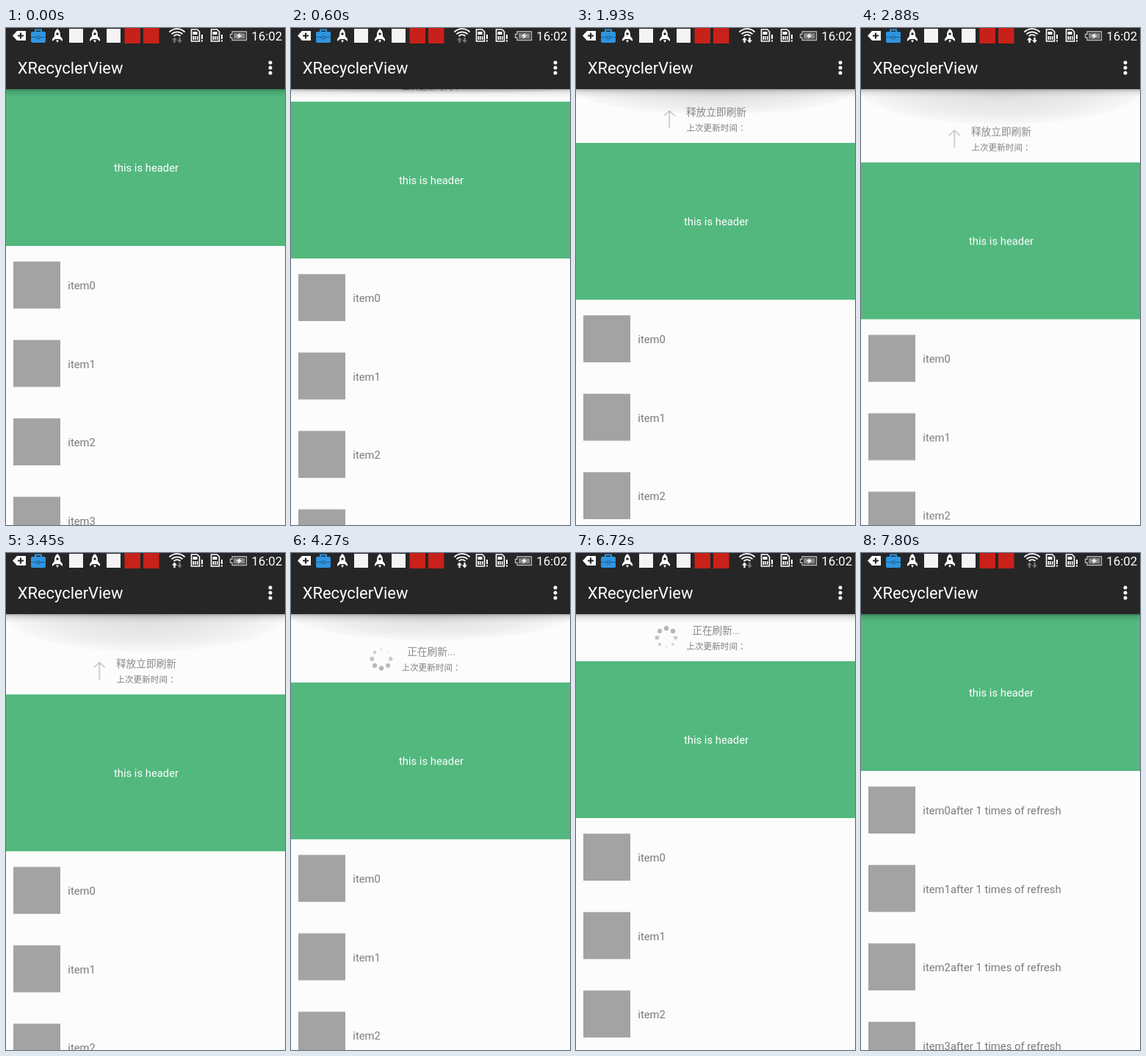
An HTML page that plays this animation: 380x675 px, repeating every 8 s.

```html
<!DOCTYPE html>
<html lang="zh-CN">
<head>
<meta charset="utf-8">
<title>XRecyclerView</title>
<style>
html, body { margin: 0; width: 100%; height: 100%; overflow: hidden; background: #fcfcfc; }
svg { display: block; width: 380px; height: 675px; }
text { font-family: Roboto, "Noto Sans CJK SC", "Noto Sans CJK", sans-serif; }
.mid { text-anchor: middle; }
.label { font-size: 14.8px; fill: #7b7b7b; }
.state { font-size: 13.7px; fill: #888; }
.stamp { font-size: 11.6px; fill: #7d7d7d; }
.colon { font-family: "Noto Sans CJK TC", "Noto Sans CJK", sans-serif; }

/* List position: slow drag, snap to the refresh height, then collapse */
.list { animation: drag 8s linear infinite; }
@keyframes drag {
  0%, 2.4% { transform: translateY(0); }
  14.125% { transform: translateY(39px); }
  24.125% { transform: translateY(73px); }
  30% { transform: translateY(88px); }
  36% { transform: translateY(99.5px); }
  43% { transform: translateY(109px); }
  46.1%, 48.5% { transform: translateY(111px); }
  49.8% { transform: translateY(112px); }
  51.75% { transform: translateY(112px); animation-timing-function: cubic-bezier(.37, 0, .63, 1); }
  55.5% { transform: translateY(64px); }
  93.6% { transform: translateY(64px); animation-timing-function: cubic-bezier(.37, 0, .63, 1); }
  97.4%, 100% { transform: translateY(0); }
}

/* Refresh states */
.pull, .release, .busy, .done, .stale { opacity: 0; animation: 8s step-end infinite; }
.pull { animation-name: pull; }
.release { animation-name: release; }
.busy { animation-name: busy; }
.done { animation-name: done; }
.stale { animation-name: stale; }
@keyframes pull { 0% { opacity: 1; } 21.4%, 100% { opacity: 0; } }
@keyframes release { 0% { opacity: 0; } 21.4% { opacity: 1; } 51.9%, 100% { opacity: 0; } }
@keyframes busy { 0% { opacity: 0; } 51.9% { opacity: 1; } 87.6%, 100% { opacity: 0; } }
@keyframes done { 0% { opacity: 0; } 87.6%, 100% { opacity: 1; } }
@keyframes stale { 0% { opacity: 1; } 87.6%, 100% { opacity: 0; } }

.suffix { fill: transparent; animation: suffix 8s step-end infinite; }
@keyframes suffix { 0% { fill: transparent; } 87.6%, 100% { fill: #7b7b7b; } }

.arrow {
  fill: none; stroke: #c4c4c4; stroke-width: 1.6; transform-origin: 0 0;
  animation: turn 8s linear infinite, hide 8s step-end infinite;
}
@keyframes turn { 0%, 21.4% { transform: rotate(0); } 23.65%, 100% { transform: rotate(-180deg); } }
@keyframes hide { 0% { opacity: 1; } 51.9%, 100% { opacity: 0; } }

.ball { fill: #b5b5b5; transform-box: fill-box; transform-origin: center; animation: ball 1s infinite; }
@keyframes ball {
  0% { transform: scale(1); opacity: 1; animation-timing-function: cubic-bezier(.47, 0, .745, .715); }
  50% { transform: scale(.4); opacity: .3; animation-timing-function: cubic-bezier(.39, .575, .565, 1); }
  100% { transform: scale(1); opacity: 1; }
}

/* Overscroll glow below the toolbar */
.glow { transform-origin: 190px 83px; animation: glow 8s linear infinite; }
@keyframes glow {
  0%, 2.4% { transform: scaleY(0); }
  14.125% { transform: scaleY(.28); }
  24.125% { transform: scaleY(.7); }
  36% { transform: scaleY(.98); }
  46.1%, 51.75% { transform: scaleY(1.08); animation-timing-function: ease-out; }
  59.5%, 100% { transform: scaleY(0); }
}

.up, .down { fill: #777; animation: 8s step-end infinite; }
.up { animation-name: up; }
.down { animation-name: down; }
@keyframes up { 0% { fill: #777; } 12.6% { fill: #fff; } 94%, 100% { fill: #777; } }
@keyframes down { 0% { fill: #777; } 21% { fill: #fff; } 40% { fill: #777; } 45% { fill: #fff; } 66%, 100% { fill: #777; } }
</style>
</head>
<body>
<svg viewBox="0 0 380 675">
  <defs>
    <linearGradient id="shade" x2="0" y2="1">
      <stop offset="0" stop-opacity=".3"/>
      <stop offset=".3" stop-opacity=".1"/>
      <stop offset=".65" stop-opacity=".035"/>
      <stop offset="1" stop-opacity="0"/>
    </linearGradient>
    <radialGradient id="haze">
      <stop offset="0" stop-opacity=".13"/>
      <stop offset=".7" stop-opacity=".06"/>
      <stop offset=".95" stop-opacity=".02"/>
      <stop offset="1" stop-opacity="0"/>
    </radialGradient>
    <g id="rocket">
      <path d="M7 0C3 3 3 7 3 10L0 14V17L4 14H10L14 17V14L11 10C11 7 11 3 7 0Z" fill="#fff"/>
      <circle cx="7" cy="7" r="1.8" fill="#262626"/>
      <path d="M5 15.5H9L7 19Z" fill="#fff"/>
    </g>
    <g id="sim">
      <path d="M1 1H9L12 4V17H1Z" fill="none" stroke="#fff" stroke-width="1.6"/>
      <path d="M3 4H9V8H3ZM3 10H5V15H3ZM6 10H7.5V15H6ZM8.5 10H10V15H8.5Z" fill="#fff"/>
      <path d="M14.5 8H16.5V14H14.5ZM14.5 15.5H16.5V17.5H14.5Z" fill="#fff"/>
    </g>
  </defs>

  <rect width="380" height="675" fill="#fcfcfc"/>

  <g class="list">
    <g transform="translate(127.3 51)">
      <path class="arrow" d="M0-12V11.5M-7.5 4.5L0 11.5L7.5 4.5"/>
    </g>
    <g id="spinner" class="busy" transform="translate(123 51)"></g>
    <text class="mid state pull" x="191" y="46">下拉刷新</text>
    <text class="mid state release" x="191" y="46">释放立即刷新</text>
    <text class="mid state busy" x="191" y="46">正在刷新...</text>
    <text class="mid state done" x="191" y="46">刷新完成</text>
    <text class="mid stamp stale" x="191" y="67.4">上次更新时间<tspan class="colon" lang="zh-TW">：</tspan></text>
    <text class="mid stamp done" x="191" y="67.4">上次更新时间<tspan class="colon" lang="zh-TW">：</tspan>刚刚</text>
    <rect y="83" width="380" height="213" fill="#52b87e"/>
    <text class="mid label" x="191" y="195" style="fill:#fff">this is header</text>
    <g id="items"></g>
  </g>

  <ellipse class="glow" cx="190" cy="83" rx="196" ry="50" fill="url(#haze)"/>
  <rect y="83" width="380" height="12" fill="url(#shade)"/>

  <rect width="380" height="83" fill="#262626"/>
  <text x="15.8" y="62" font-size="21.9" fill="#fff">XRecyclerView</text>
  <g fill="#fff">
    <circle cx="360" cy="47" r="2.5"/>
    <circle cx="360" cy="54" r="2.5"/>
    <circle cx="360" cy="61" r="2.5"/>
  </g>

  <!-- Status bar -->
  <path d="M9 10.5L15 4H27V17H15Z" fill="#fff"/>
  <path d="M20 6.5V14.5M16 10.5H24" stroke="#262626" stroke-width="2.2"/>
  <path d="M40 6V2.5H48V6" fill="none" stroke="#2f95df" stroke-width="2"/>
  <rect x="34" y="5" width="20" height="15" rx="2" fill="#2f95df"/>
  <path d="M34 12.5H42M46 12.5H54M42 11V14.5H46V11Z" fill="none" stroke="#1c5c90"/>
  <use href="#rocket" x="63" y="1"/>
  <rect x="86" y="1" width="19" height="19" fill="#f4f4f4"/>
  <use href="#rocket" x="114" y="1"/>
  <rect x="137" y="1" width="19" height="19" fill="#f4f4f4"/>
  <rect x="161.5" width="21.5" height="21" fill="#c8211a"/>
  <rect x="187" width="21.5" height="21" fill="#c8211a"/>
  <path d="M222.5 5.5A15 15 0 0 1 243.5 5.5M225.5 8.3A11 11 0 0 1 240.5 8.3M228.5 11A6.5 6.5 0 0 1 237.5 11" fill="none" stroke="#fff" stroke-width="1.8"/>
  <path class="up" d="M229.5 12.5L233 16.5H230.7V20H228.3V16.5H226Z"/>
  <path class="down" d="M236.5 20.5L240 16.5H237.7V13H235.3V16.5H233Z"/>
  <use href="#sim" x="251.5" y="1"/>
  <use href="#sim" x="278.5" y="1"/>
  <path d="M308 5H327.500V16.500H308V13H305.500V8.500H308Z" fill="none" stroke="#bbb" stroke-width="1.3"/>
  <rect x="310" y="7" width="15.5" height="7.500" fill="#858585"/>
  <path d="M319.500 6.500L313.500 11.200H317L315.500 15L321.500 10H318Z" fill="#fff"/>
  <text x="334.300" y="17" font-size="16.900" fill="#fff">16:02</text>
</svg>
<script>
const fill = (id, count, part) => {
  document.getElementById(id).innerHTML = Array.from({ length: count }, (_, i) => part(i)).join("");
};

fill("items", 4, i => {
  const y = 317.2 + i * 106.5;
  return `<rect x="10" y="${y}" width="64" height="63.800" fill="#a3a3a3"/>
    <text class="label" x="84.300" y="${y + 37.800}">item${i}<tspan class="suffix">after 1 times of refresh</tspan></text>`;
});

fill("spinner", 8, i => {
  const angle = i * Math.PI / 4;
  const delay = Math.min(i * 120, 780) - 990;
  return `<circle class="ball" cx="${12.7 * Math.cos(angle)}" cy="${12.7 * Math.sin(angle)}" r="3.2" style="animation-delay:${delay}ms"/>`;
});
</script>
</body>
</html>
```
